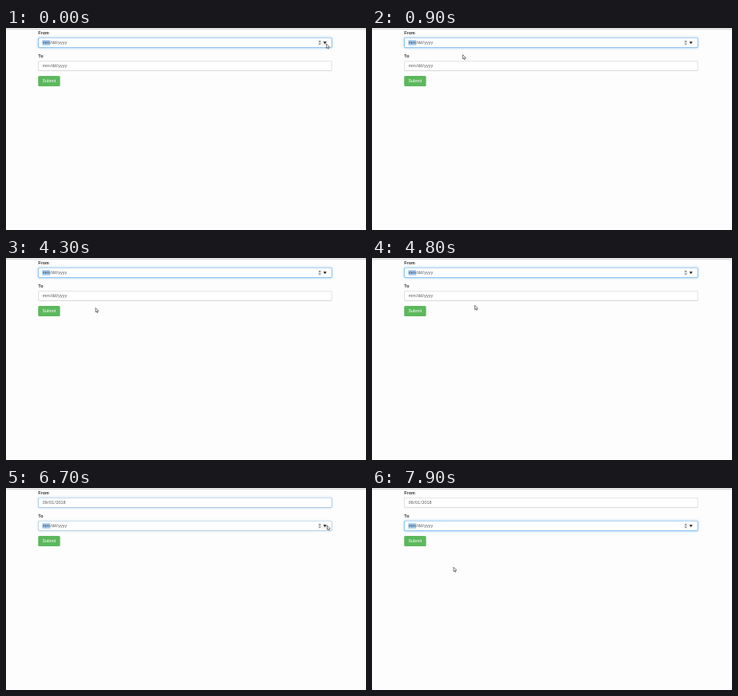
Recreate the animation shown at these times as an HTML page with a canvas. Size 450 by 253 pixels, loop 8000 ms.

```html
<!DOCTYPE html>
<html lang="en">
<head>
<meta charset="utf-8">
<title>Date range form</title>
<style>
  html, body { margin: 0; width: 100%; height: 100%; overflow: hidden; background: #fdfdfd; }
  canvas { display: block; width: 450px; height: 253px; }
</style>
</head>
<body>
<canvas id="stage"></canvas>
<script>
const W = 450, H = 253, LOOP = 8000;
const FONT = '5.4px "Liberation Sans", Arial, sans-serif';
const canvas = document.getElementById('stage');
const ctx = canvas.getContext('2d');
const ratio = window.devicePixelRatio || 1;
canvas.width = Math.round(W * ratio);
canvas.height = Math.round(H * ratio);
ctx.scale(ratio, ratio);

// Pointer tip: [time, x, y], held until the next entry.
const pointerPath = [
  [0, 400.5, 20], [100, 330, 24], [200, 235, 28], [300, 154, 29.5],
  [500, 149, 44], [600, 138, 57], [700, 124, 62], [800, 115, 50], [900, 113.5, 33.5],
  [3900, 109.5, 43.3], [4000, 106.5, 51], [4100, 105.5, 57], [4200, 107.5, 61],
  [4300, 112, 62.5], [4400, 117, 62.5], [4500, 121, 62], [4600, 124.5, 61],
  [4700, 127, 60], [4800, 128.5, 59.3],
  [5600, 220, 53], [5700, 344, 43], [5900, 349.5, 41.3], [6000, 362, 42],
  [6100, 376, 43.5], [6200, 389, 45], [6300, 398, 46.3], [6400, 401.5, 47],
  [7400, 365, 53], [7500, 265, 73], [7600, 188.5, 86.5],
  [7800, 140, 94], [7900, 102, 99.2]
];

function heldAt(path, t) {
  let current = path[0];
  for (const key of path) if (key[0] <= t) current = key;
  return current;
}

function mix(a, b, k) {
  return `rgb(${a.map((v, i) => Math.round(v + (b[i] - v) * k)).join()})`;
}

function polygon(points, color) {
  ctx.beginPath();
  points.forEach(([x, y]) => ctx.lineTo(x, y));
  ctx.closePath();
  ctx.fillStyle = color;
  ctx.fill();
}

function box(x, y, w, h, r) {
  ctx.beginPath();
  ctx.roundRect(x, y, w, h, r);
}

function text(str, x, y, color, bold) {
  ctx.font = (bold ? 'bold ' : '') + FONT;
  ctx.fillStyle = color;
  ctx.fillText(str, x, y);
}

function dateText(value, baseline, selected) {
  const pad = 0.4;
  let x = 45.4;
  ctx.font = FONT;
  value.split('/').forEach((part, i) => {
    if (i) {
      text('/', x, baseline, '#555');
      x += ctx.measureText('/').width;
    }
    const width = ctx.measureText(part).width;
    if (selected && i === 0) {
      ctx.fillStyle = '#a3cbf0';
      ctx.fillRect(x, baseline - 5.2, width + 2 * pad, 6.6);
    }
    text(part, x + pad, baseline, selected && i === 0 ? '#34495c' : '#555');
    x += width + 2 * pad;
  });
}

function controls(mid, hovered) {
  ctx.fillStyle = '#f0f0f0';
  ctx.fillRect(390, mid - 3.4, 4.4, 6.8);
  if (hovered) ctx.fillRect(395.2, mid - 3.4, 7.4, 6.8);
  polygon([[390.8, mid - 1], [393.6, mid - 1], [392.2, mid - 2.7]], '#555');
  polygon([[390.8, mid + 1], [393.6, mid + 1], [392.2, mid + 2.7]], '#555');
  polygon([[396.6, mid - 1.5], [400.8, mid - 1.5], [398.7, mid + 1.9]], '#333');
}

function clearMark(mid) {
  ctx.beginPath();
  ctx.moveTo(385.1, mid - 1.4); ctx.lineTo(387.9, mid + 1.4);
  ctx.moveTo(387.9, mid - 1.4); ctx.lineTo(385.1, mid + 1.4);
  ctx.strokeStyle = '#444';
  ctx.lineWidth = 0.9;
  ctx.stroke();
}

function field(top, state) {
  const mid = top + 6.4;
  ctx.save();
  ctx.shadowColor = `rgba(102,175,233,${0.7 * state.focus})`;
  ctx.shadowBlur = 3.2 * ratio;
  box(40.2, top, 367.2, 12.9, 1.6);
  ctx.fillStyle = mix([204, 204, 204], [102, 175, 233], state.focus);
  ctx.fill();
  ctx.restore();
  box(40.8, top + 0.6, 366, 11.7, 1.1);
  ctx.fillStyle = '#fff';
  ctx.fill();
  dateText(state.value, mid + 1.9, state.selected);
  if (state.controls) controls(mid, state.hovered);
  if (state.clear) clearMark(mid);
}

function pointer(x, y) {
  const shape = [[0, 0], [0, 5.3], [1.2, 4.3], [2, 6.1], [2.9, 5.7], [2.1, 3.9], [3.8, 3.8]];
  polygon(shape.map(([dx, dy]) => [x + dx, y + dy]), '#fff');
  ctx.strokeStyle = '#444';
  ctx.lineWidth = 0.7;
  ctx.stroke();
}

function draw(t) {
  const switched = t >= 6700, settled = t >= 6800;
  const filled = t >= 5400;

  ctx.fillStyle = '#fdfdfd';
  ctx.fillRect(0, 0, W, H);
  ctx.fillStyle = '#ececec';
  ctx.fillRect(0, 0, W, 1);
  ctx.fillStyle = '#d4d4d4';
  ctx.fillRect(0, 1, W, 1);

  text('From', 40.3, 7.7, '#333', true);
  field(12, {
    value: filled ? '09/01/2018' : 'mm/dd/yyyy',
    focus: settled ? 0 : switched ? 0.6 : 1,
    selected: !switched,
    controls: !switched,
    clear: filled && !switched,
    hovered: t < 100
  });

  text('To', 40.3, 36.7, '#333', true);
  field(41, {
    value: 'mm/dd/yyyy',
    focus: settled ? 1 : switched ? 0.4 : 0,
    selected: switched,
    controls: t >= 5700,
    hovered: t >= 6300 && t < 7400
  });

  box(40.2, 60, 27.4, 13, 1.6);
  ctx.fillStyle = '#5cb85c';
  ctx.fill();
  text('Submit', 45.4, 68.3, '#fff');

  const [, x, y] = heldAt(pointerPath, t);
  pointer(x, y);
}

const start = performance.now();
function tick() {
  draw((performance.now() - start) % LOOP);
  requestAnimationFrame(tick);
}
tick();
</script>
</body>
</html>
```
